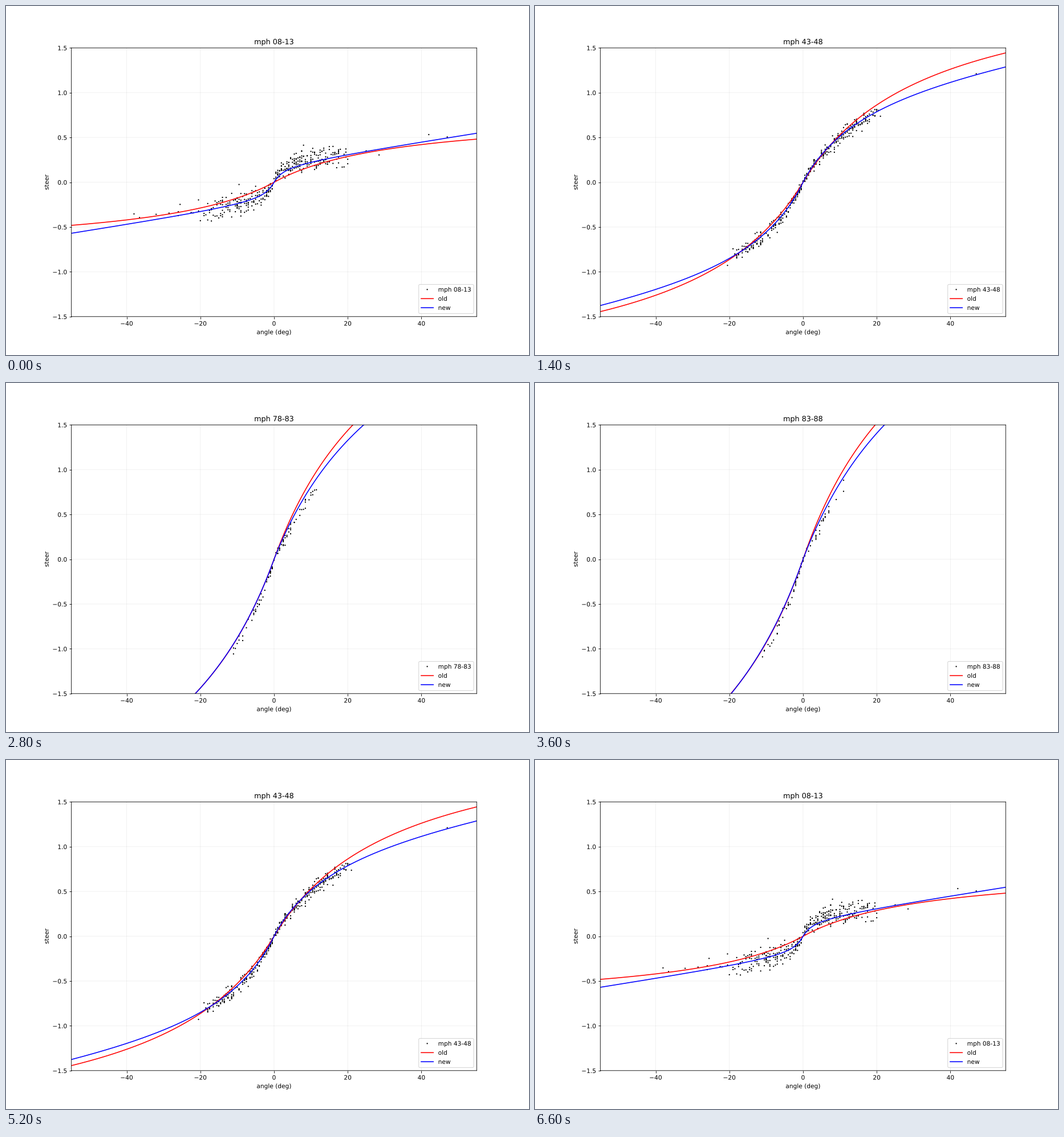
These frames come from a looping animation (917 px wide and 611 px high, 6.8 s). A matplotlib script:

```python
import numpy as np
import matplotlib.pyplot as plt
from matplotlib.animation import FuncAnimation
from matplotlib.patheffects import Normal

W, H, DPI = 917, 611, 76.4
BANDS = 17            # speed bands, 5 mph apart, swept up and back down
MPH_TO_MS = 0.44704

# Soft edges: no pixel snapping, and text filled as outlines without hinting
plt.rcParams["path.snap"] = False
plt.rcParams["path.effects"] = [Normal()]
plt.rcParams["text.hinting"] = "none"


def squash(x):
    return x / (1 + np.abs(x))


def old_steer(angle, v):
    return 0.10006696 * squash(0.02904609 * angle) * (v + 3.12485927)


def new_steer(angle, v):
    gain = np.where(angle > 0, 0.00154548, 0.00168327)
    bend = gain * squash(1.23514093 * angle / v) * (v + 8.5927) ** 2
    a = 0.16283995 * angle
    return bend + 0.0389127 * (a - np.arctan(a))


def band_speed(band):
    return (10.5 + 5 * band) * MPH_TO_MS


def make_points(band):
    rng = np.random.default_rng(100 + band)
    v = band_speed(band)
    n = int(430 * np.exp(-((band - 3.5) / 8.5) ** 2))

    # Fast driving needs small angles; slow bands have a long thin tail.
    reach = min(430 / v, 20 + 5 * band)
    far = reach * rng.beta(1, 1.4, n)
    tail = rng.random(n) < 0.12 * np.exp(-band / 5)
    far = np.where(tail, far * (1 + rng.exponential(0.8, n)), far)
    x = rng.choice([-1, 1], n) * np.minimum(far, 47)
    x = np.round(2 * x) / 2
    far = np.abs(x)

    # Readings drift low at speed, and rise early on the right when slow.
    drift = -0.0004 * band ** 2 * np.tanh(far / 3)
    bump = max(0, 0.045 * (1 - band / 10)) * far / 4 * np.exp(1 - far / 4)
    spread = (0.035 + 0.03 * np.exp(-band / 5)) * np.minimum(1, 0.4 + far / 8)
    y = new_steer(x, v) + drift + bump * (x > 0) + spread * rng.normal(size=n)
    return x, y


points = [make_points(b) for b in range(BANDS)]
angles = np.linspace(-55, 55, 1101)

# nextafter keeps the pixel size from being truncated downwards
size = [np.nextafter(px / DPI, np.inf) for px in (W, H)]
fig, ax = plt.subplots(figsize=size, dpi=DPI)
dots, = ax.plot([], [], "k.", ms=2.2, label="mph 08-13")
old_line, = ax.plot([], [], color="red", label="old")
new_line, = ax.plot([], [], color="blue", label="new")
ax.set(xlim=(-55, 55), ylim=(-1.5, 1.5), xlabel="angle (deg)", ylabel="steer")
ax.grid(alpha=0.2)
title = ax.set_title("mph 08-13")
legend = ax.legend(loc="lower right")


def draw(frame):
    band = min(frame, 2 * BANDS - 1 - frame)
    v = band_speed(band)
    low = 8 + 5 * band
    name = f"mph {low:02d}-{low + 5:02d}"
    dots.set_data(*points[band])
    old_line.set_data(angles, old_steer(angles, v))
    new_line.set_data(angles, new_steer(angles, v))
    title.set_text(name)
    legend.get_texts()[0].set_text(name)
    return dots, old_line, new_line, title, legend


anim = FuncAnimation(fig, draw, frames=2 * BANDS, interval=200,
                     repeat=True, repeat_delay=0, blit=False)
plt.show()
```
